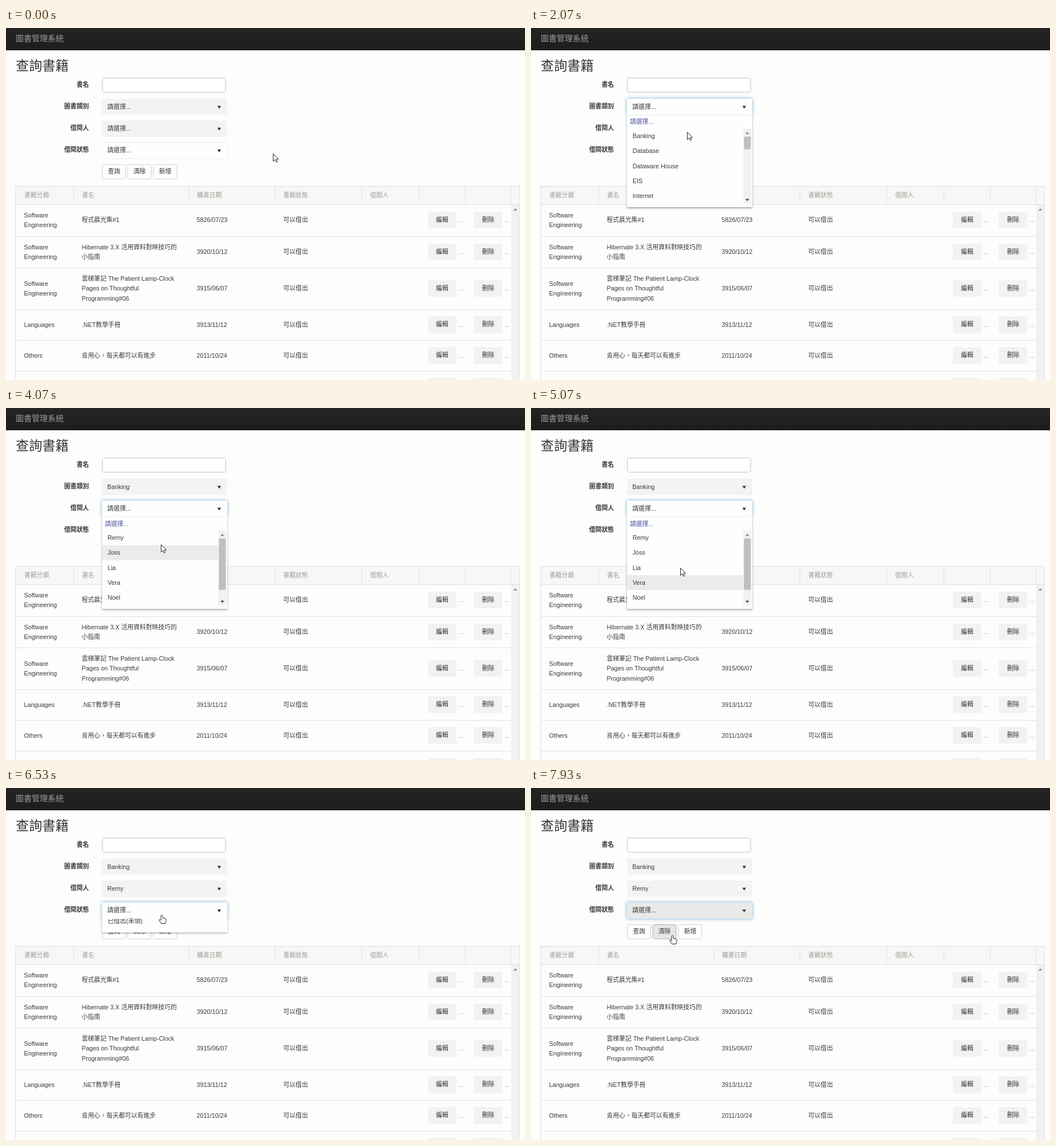
Write an HTML page with a canvas that moves like this. It is 908 px wide and 617 px high and loops after 8000 ms.

```html
<!DOCTYPE html>
<html lang="zh-Hant">
<head>
<meta charset="utf-8">
<title>圖書管理系統</title>
<style>
html, body { margin: 0; width: 100%; height: 100%; overflow: hidden; background: #fdfdfc; }
canvas { display: block; }
</style>
</head>
<body>
<canvas id="stage" width="908" height="617"></canvas>
<script>
const ctx = document.getElementById('stage').getContext('2d');
const LOOP = 8000, SLIDE = 250, HOVER_LAG = 80;
const FAMILY = '"Liberation Sans", "Noto Sans CJK TC", "Noto Sans CJK", sans-serif';
const SELECT = { x: 168, w: 219, h: 28.5 };
const ITEM = 26.3;

const selects = [
  { label: '圖書類別', y: 124, open: 1430, close: 2770, blur: 3450, value: 'Banking',
    items: ['Banking', 'Database', 'Dataware House', 'EIS', 'Internet'], thumb: 22 },
  { label: '借閱人', y: 162.2, open: 3460, close: 5620, blur: 6500, value: 'Remy',
    items: ['Remy', 'Joss', 'Lia', 'Vera', 'Noel'], thumb: 90 },
  { label: '借閱狀態', y: 200.4, open: 6515, close: 7270, blur: LOOP, value: '請選擇...',
    items: ['可以借出', '已借出', '不可借出', '已借出(未領)'], thumb: 0 }
];

const buttons = [['查詢', 168], ['清除', 212.5], ['新增', 257.5]];

const columns = [118.5, 320.5, 470.5, 622.5, 722.5, 803.5, 883.5];
const headings = [['書籍分類', 32], ['書名', 133], ['購書日期', 334], ['書籍狀態', 485], ['借閱人', 637]];
const rows = [
  { y: 336.5, bottom: 365, kind: ['Software', 'Engineering'], name: ['程式晨光集#1'], date: '5826/07/23' },
  { y: 392.5, bottom: 420, kind: ['Software', 'Engineering'],
    name: ['Hibernate 3.X 活用資料對映技巧的', '小指南'], date: '3920/10/12' },
  { y: 456.5, bottom: 493, kind: ['Software', 'Engineering'],
    name: ['雲梯筆記 The Patient Lamp-Clock', 'Pages on Thoughtful', 'Programming#06'], date: '3915/06/07' },
  { y: 520, bottom: 547, kind: ['Languages'], name: ['.NET教學手冊'], date: '3913/11/12' },
  { y: 574, bottom: 601, kind: ['Others'], name: ['肯用心，每天都可以有進步'], date: '2011/10/24' },
  { y: 628, bottom: 655, kind: [], name: [], date: '' }
];

// Pointer stops: time, x, y
const pointerPath = [
  [0, 467, 220], [330, 467, 220], [730, 447, 205], [930, 447, 205], [1330, 273, 145],
  [1930, 273, 145], [2070, 273, 182], [3270, 273, 182], [3330, 273, 189], [3730, 273, 189],
  [3930, 271, 246], [4070, 271, 239], [4200, 270, 248], [4600, 262, 330], [4940, 261, 318],
  [5070, 261, 280], [5400, 268, 227], [5620, 268, 227], [5930, 272, 222], [7500, 272, 222],
  [7900, 247, 258], [LOOP, 247, 258]
];

const arrowShape = new Path2D('M0 0V13L3 10.2L5.2 14.6L7.2 13.6L5.2 9.5H9.2Z');
const handShape = new Path2D('M-1.5 1Q0-1 1.5 1V5L3.5 5.4L5.5 6L7.5 7V11L6 15H-1L-4.5 9.5Q-5 7.5-3 8L-1.5 9.5Z');

const clamp = v => Math.max(0, Math.min(1, v));
const smooth = u => u * u * (3 - 2 * u);
const easeOut = u => 1 - (1 - u) ** 3;

function pointerAt(t) {
  const i = Math.max(1, pointerPath.findIndex(stop => stop[0] >= t));
  const [t0, x0, y0] = pointerPath[i - 1], [t1, x1, y1] = pointerPath[i];
  const u = smooth(clamp((t - t0) / (t1 - t0)));
  return { x: x0 + (x1 - x0) * u, y: y0 + (y1 - y0) * u };
}

const inside = (p, x, y, w, h) => p.x >= x && p.x <= x + w && p.y >= y && p.y <= y + h;

function text(str, x, y, { size = 10.8, color = '#3a3a3a', weight = 400, align = 'left' } = {}) {
  ctx.font = `${weight} ${size}px ${FAMILY}`;
  ctx.fillStyle = color;
  ctx.textAlign = align;
  ctx.fillText(str, x, y + size * 0.37);
}

function rect(x, y, w, h, color) {
  ctx.fillStyle = color;
  ctx.fillRect(x, y, w, h);
}

function box(x, y, w, h, fill, stroke, radius = 0) {
  ctx.beginPath();
  ctx.roundRect(x, y, w, h, radius);
  ctx.fillStyle = fill;
  ctx.fill();
  ctx.shadowColor = 'transparent';
  if (stroke) {
    ctx.strokeStyle = stroke;
    ctx.stroke();
  }
}

function shadow(color, blur, dy = 0) {
  ctx.shadowColor = color;
  ctx.shadowBlur = blur;
  ctx.shadowOffsetY = dy;
}

function triangle(x, y, size, color) {
  ctx.beginPath();
  ctx.moveTo(x - 3.2, y - size / 2);
  ctx.lineTo(x + 3.2, y - size / 2);
  ctx.lineTo(x, y + size / 2);
  ctx.fillStyle = color;
  ctx.fill();
}

function lines(list, x, y) {
  list.forEach((str, i) => text(str, x, y + (i - (list.length - 1) / 2) * 17.4));
}

function drawPage() {
  rect(0, 0, 908, 617, '#fdfdfc');
  const bar = ctx.createLinearGradient(0, 0, 0, 38);
  bar.addColorStop(0, '#242424');
  bar.addColorStop(1, '#1d1d1d');
  rect(0, 0, 908, 38, bar);
  rect(0, 38, 908, 1, '#101010');
  text('圖書管理系統', 17, 18, { size: 14, color: '#9a9a9a' });
  text('查詢書籍', 17, 65, { size: 23.2, color: '#333', weight: 300 });
  text('書名', 145, 99, { weight: 700, align: 'right', color: '#333' });
  box(168.5, 87.5, 216, 25, '#fff', '#c4c4be', 3);
}

function drawTable() {
  rect(17, 277, 882, 33, '#f7f7f5');
  rect(17, 277, 882, 1, '#dededb');
  rect(17, 309, 882, 1, '#e0e0dd');
  rect(16.5, 277, 1, 340, '#dcdcd9');
  rect(898, 277, 1, 340, '#e2e2df');
  for (const x of columns) rect(x - 0.5, 278, 1, 31, '#e2e2df');
  for (const [str, x] of headings) text(str, x, 293, { color: '#9c9c99' });
  for (const row of rows) {
    lines(row.kind, 31.5, row.y);
    lines(row.name, 132.5, row.y);
    text(row.date, 333.5, row.y);
    if (row.date) text('可以借出', 485, row.y);
    for (const [str, x] of [['編輯', 738], ['刪除', 818.5]]) {
      rect(x, row.y - 14.5, 49.5, 29, '#f2f2f0');
      text(str, x + 25, row.y - 0.5, { align: 'center', color: '#333' });
      text('...', x + 53.5, row.y, { color: '#8c8c98' });
    }
    rect(17, row.bottom, 867, 1, '#e1e1de');
  }
  rect(884, 310, 14, 307, '#f1f1ef');
  triangle(891, 318, -4, '#888');
}

function drawButtons(p) {
  for (const [str, x] of buttons) {
    const hover = inside(p, x, 239, 41, 26);
    box(x + 0.5, 239.5, 41, 25, hover ? '#e6e6e6' : '#fefefe', hover ? '#b0b0b0' : '#cfcfcc', 3);
    text(str, x + 21, 251.5, { align: 'center', color: '#333' });
  }
}

const popupHeight = s => 24 + ITEM * s.items.length + 6;
const popupShown = (s, t) =>
  t < s.close ? easeOut(clamp((t - s.open) / SLIDE)) : 1 - easeOut(clamp((t - s.close) / SLIDE));

function drawPopup(s, t) {
  const shown = popupShown(s, t);
  if (!shown) return;
  const { x, w } = SELECT, top = s.y + SELECT.h, height = popupHeight(s);
  const listTop = top + 23.5, listHeight = ITEM * s.items.length;
  const listWidth = s.thumb ? 203 : w;
  ctx.save();
  ctx.beginPath();
  ctx.rect(x - 8, top, w + 16, height * shown + 8);
  ctx.clip();
  ctx.translate(0, -(1 - shown) * height);
  shadow('rgba(0,0,0,.35)', 3, 1.5);
  box(x, top, w, height, '#fefefe');
  text('請選擇...', x + 5, top + 12, { color: '#4b539f' });
  const hoverPoint = pointerAt(t - HOVER_LAG);
  s.items.forEach((item, i) => {
    const y = listTop + i * ITEM;
    if (inside(hoverPoint, x, y, listWidth, ITEM)) rect(x, y, listWidth, ITEM, '#ebebea');
    text(item, x + 9.7, y + 13);
  });
  if (s.thumb) {
    rect(371.5, listTop + 0.5, 14, listHeight, '#f1f1f0');
    rect(372.5, listTop + 14.5, 12, s.thumb, '#bfbfbf');
    triangle(378.5, listTop + 8, -4, '#8a8a8a');
    triangle(378.5, listTop + listHeight - 6, 4, '#444');
  }
  ctx.restore();
}

function drawSelect(s, t, p) {
  const { x, w, h } = SELECT;
  const last = s === selects[2];
  const open = popupShown(s, t) > 0;
  const focus = t >= s.open - 30 && t < s.blur;
  const covered = selects.some(other => other !== s && popupShown(other, t) > 0);
  const hover = !covered && (inside(p, x, s.y, w, h) || (last && t > s.close));
  const resting = last && t < 330;
  const fill = open || resting ? '#fefefe' : hover ? '#e9e9e8' : '#f3f3f1';
  ctx.save();
  if (focus) shadow('rgba(70,150,200,.75)', 6);
  else if (hover) shadow('rgba(0,0,0,.3)', 4, 1);
  box(x, s.y, w, h, fill, resting ? '#eeeeec' : null, 1);
  ctx.restore();
  const value = t >= s.close ? s.value : '請選擇...';
  text(value, x + 9.3, s.y + 14);
  triangle(373, s.y + 15, 5, '#333');
}

function drawPointer(p, t) {
  const popup = selects.find(s => popupShown(s, t) > 0);
  const overPopup = popup && inside(p, SELECT.x, popup.y + SELECT.h, SELECT.w, popupHeight(popup) * popupShown(popup, t));
  const overSelect = selects.some(s => inside(p, SELECT.x, s.y, SELECT.w, SELECT.h));
  const overButton = buttons.some(([, x]) => inside(p, x, 239, 41, 26));
  const shape = !overPopup && (overSelect || overButton) ? handShape : arrowShape;
  ctx.save();
  ctx.translate(p.x + 0.5, p.y + 0.5);
  ctx.fillStyle = '#fff';
  ctx.strokeStyle = '#222';
  ctx.fill(shape);
  ctx.stroke(shape);
  ctx.restore();
}

function draw(t) {
  const p = pointerAt(t);
  drawPage();
  drawTable();
  drawButtons(p);
  for (const s of selects) {
    text(s.label, 145, s.y + 13, { weight: 700, align: 'right', color: '#333' });
    drawSelect(s, t, p);
  }
  for (const s of selects) {
    if (!popupShown(s, t)) continue;
    drawPopup(s, t);
  }
  drawPointer(p, t);
}

const start = performance.now();
function tick() {
  draw((performance.now() - start) % LOOP);
  requestAnimationFrame(tick);
}
tick();
</script>
</body>
</html>
```
